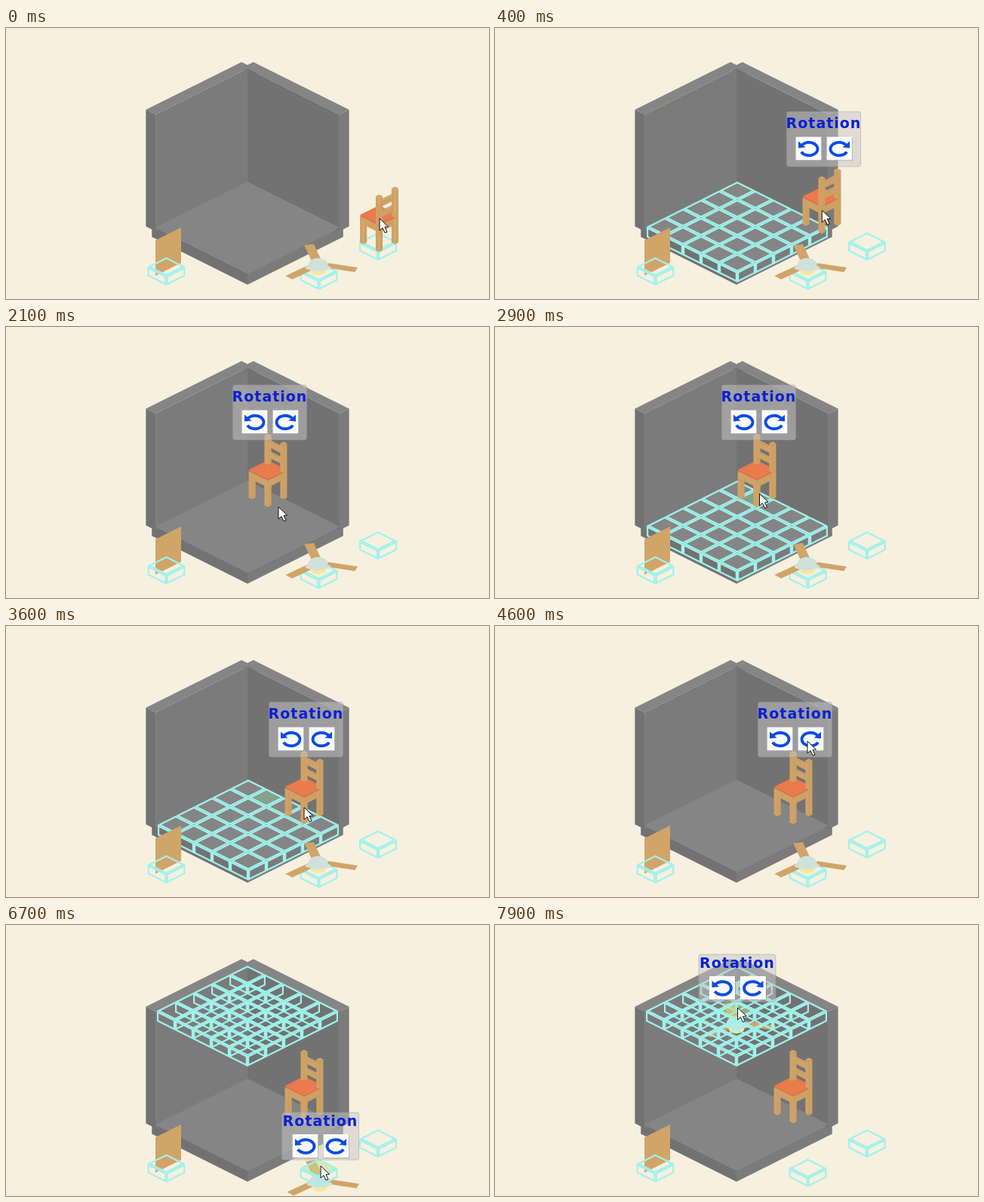
These frames come from a looping animation (640x360 px, 8000 ms). An HTML page with a canvas:

```html
<!DOCTYPE html>
<html lang="en">
<head>
<meta charset="utf-8">
<title>Room furnishing</title>
<style>
html, body { margin: 0; width: 640px; height: 360px; overflow: hidden; background: #f7f0df; }
canvas { display: block; }
</style>
</head>
<body>
<canvas id="stage" width="640" height="360"></canvas>
<script>
const ctx = document.getElementById('stage').getContext('2d');
const LOOP = 8000, STEP = 100;
const CYAN = '#a0f2eb', BLUE = '#0b4be6';
// Colours of the top, front left and front right faces
const GREY = ['#858585', '#727272', '#7b7b7b'];
const WOOD = ['#d1a468', '#cfa266', '#cda064'];
const CUSHION = ['#e97b4c', '#dd7046', '#dd7046'];

// Each move eases to x, y between its start and end times
const move = (start, end, x, y) => ({ start, end, x, y });
const CURSOR = [
  move(0, 0, 495, 253), move(0, 900, 347, 227), move(1200, 1600, 326, 122),
  move(1900, 2100, 361, 239), move(2200, 3100, 349, 219), move(3100, 3600, 395, 241),
  move(3700, 4150, 492, 150), move(4150, 4600, 414, 153), move(6000, 6500, 417, 320),
  move(6700, 7100, 432, 304), move(7400, 7900, 321.5, 110)
];
const CHAIR = [
  move(0, 0, 494.5, 285), move(0, 900, 347, 226.5), move(3100, 3600, 395, 250.5)
];

function follow(moves, t) {
  let { x, y } = moves[0];
  for (const m of moves.slice(1)) {
    const k = Math.min(1, Math.max(0, (t - m.start) / (m.end - m.start)));
    const ease = k * k * (3 - 2 * k);
    x += (m.x - x) * ease;
    y += (m.y - y) * ease;
  }
  return [x, y];
}

function at(x, y, draw) {
  ctx.save();
  ctx.translate(x, y);
  draw();
  ctx.restore();
}

function trace(points) {
  ctx.beginPath();
  for (const [x, y] of points) ctx.lineTo(x, y);
  ctx.closePath();
}

function poly(color, points) {
  trace(points);
  ctx.fillStyle = color;
  ctx.fill();
}

function ellipse(color, x, y, rx, ry) {
  ctx.fillStyle = color;
  ctx.beginPath();
  ctx.ellipse(x, y, rx, ry, 0, 0, 7);
  ctx.fill();
}

// Isometric view: a runs down right, b down left (in tiles), z up (in pixels)
const iso = (a, b, z) => [24 * (a - b), 12 * (a + b) - z];

// Visible faces of a box: top, front left, front right
const faces = ([a0, b0, z0, a1, b1, z1]) => [
  [iso(a0, b0, z1), iso(a1, b0, z1), iso(a1, b1, z1), iso(a0, b1, z1)],
  [iso(a0, b1, z1), iso(a1, b1, z1), iso(a1, b1, z0), iso(a0, b1, z0)],
  [iso(a1, b0, z1), iso(a1, b1, z1), iso(a1, b1, z0), iso(a1, b0, z0)]
];

const solid = (box, colors) => faces(box).forEach((face, i) => poly(colors[i], face));

// Border along the inside of every face
function frame(box) {
  for (const face of faces(box)) {
    ctx.save();
    trace(face);
    ctx.clip();
    ctx.strokeStyle = CYAN;
    ctx.lineWidth = 4.4;
    ctx.stroke();
    ctx.restore();
  }
}

function room() {
  const lap = -.2, out = -.53, end = 5.08, top = 150;
  solid([lap, lap, -15, end, end, 0], GREY);
  solid([lap, out, 0, 0, 0, top], GREY);
  solid([out, lap, -5, 0, end, top], GREY);
  solid([0, out, -5, end, 0, top], GREY);
  poly(GREY[0], [iso(0, 0, 0), iso(end, 0, 0), iso(end, end, 0), iso(0, end, 0)]);
}

function grid(z, filled, lit) {
  for (let a = 0; a < 5; a++) for (let b = 0; b < 5; b++) {
    const box = [a, b, z - 14, a + 1, b + 1, z];
    if (filled) solid(box, GREY);
    if (lit && lit.a === a && lit.b === b) poly(lit.color, faces(box)[0]);
    frame(box);
  }
}

const slot = (x, y) => at(x, y, () => frame([-.52, -.52, -12.5, .52, .52, 0]));

function fan(x, y) {
  at(x, y, () => {
    for (let i = 0; i < 3; i++) {
      ctx.save();
      ctx.scale(1, .5);
      ctx.rotate((17 + 120 * i) * Math.PI / 180);
      ctx.fillStyle = WOOD[0];
      ctx.fillRect(12, -6.5, 41, 13);
      ctx.restore();
    }
    ellipse('#f8e7a0', 0, 9, 10.5, 6);
    ellipse('#cfe2d9', 0, 1, 13, 9);
    ellipse('#cfe2d9', 0, 5, 17, 4);
  });
}

// Quarter turns of a box about the vertical axis
const spin = ([a0, b0, z0, a1, b1, z1], turns) =>
  turns ? spin([-b1, a0, z0, -b0, a1, z1], turns - 1) : [a0, b0, z0, a1, b1, z1];

function chair(x, y, turn) {
  const depth = ([a0, b0, , a1, b1]) => a0 + b0 + a1 + b1;
  const build = boxes => boxes.sort((m, n) => depth(m) - depth(n)).forEach(b => solid(b, WOOD));
  const post = (a, z0, z1) => [a, -.53, z0, a + .19, -.34, z1];
  const rail = (z0, z1) => [-.34, -.49, z0, .34, -.4, z1];
  at(x, y, () => {
    build([0, 1, 2, 3].flatMap(k => [spin(post(-.53, 0, 32), k), spin(rail(25, 32), k)]));
    solid([-.53, -.53, 31, .53, .53, 35], WOOD);
    solid([-.52, -.52, 35, .52, .52, 37], CUSHION);
    build([post(-.53, 35, 72), post(.34, 35, 72), rail(58, 66), rail(44, 51)]
      .map(b => spin(b, turn)));
  });
}

function button(x, y, flip, pressed) {
  at(x, y, () => {
    ctx.fillStyle = '#777';
    ctx.fillRect(-17, -15, 34.5, 31);
    ctx.fillStyle = pressed ? '#a9a9a9' : '#fbfbfb';
    ctx.fillRect(-17, -15.5, 34, 31);
    ctx.scale(flip, 1);
    ctx.strokeStyle = BLUE;
    ctx.lineWidth = 3.8;
    ctx.beginPath();
    ctx.ellipse(.5, .5, 11.5, 8.7, 0, 2.65, -2.7, true);
    ctx.stroke();
    poly(BLUE, [[-13.5, -9.5], [-13.5, -.5], [-4, -1.5]]);
  });
}

function panel(x, y, w, h, baseline, pressed) {
  at(x, y, () => {
    ctx.fillStyle = 'rgba(200,200,200,.5)';
    ctx.strokeStyle = 'rgba(150,150,150,.45)';
    ctx.lineWidth = 1;
    ctx.beginPath();
    ctx.roundRect(.5, .5, w - 1, h - 1, 3);
    ctx.fill();
    ctx.stroke();
    ctx.fillStyle = '#0a20d6';
    ctx.font = 'bold 19px "DejaVu Sans", sans-serif';
    ctx.letterSpacing = '1px';
    ctx.textAlign = 'center';
    ctx.fillText('Rotation', w / 2, baseline);
    for (const side of [-1, 1])
      button(w / 2 + .5 + 20.5 * side, baseline + 27, -side, pressed === side);
  });
}

function pointer(x, y) {
  at(x, y, () => {
    poly('#fff', [[0, 0], [0, 16], [4, 12.5], [7, 19], [10, 18], [7, 11.5], [11.5, 11]]);
    ctx.strokeStyle = '#111';
    ctx.lineWidth = 1;
    ctx.stroke();
  });
}

// One left turn, then a full circle of right turns
function turnAt(t) {
  if (t < 1800) return 1;
  return t < 4700 ? 0 : Math.min(4, Math.floor((t - 4700) / 300)) % 4;
}

function pressedAt(t) {
  if (t === 1700) return -1;
  return t > 4700 && t < 5900 && (t - 4700) % 300 === 200 ? 1 : 0;
}

function render(t) {
  const [mx, my] = follow(CURSOR, t), [cx, cy] = follow(CHAIR, t);
  const dragChair = (t >= 100 && t < 1000) || (t >= 2600 && t < 3800);
  const dragFan = t >= 6700, overRoom = my < 200;
  const glow = 'rgba(190,225,145,.5)';

  ctx.fillStyle = '#f7f0df';
  ctx.fillRect(0, 0, 640, 360);
  at(320, 204, room);
  if (dragChair) at(321, 204, () => grid(0, true, t >= 800 && { a: 1, b: 0, color: '#86a189' }));
  poly(WOOD[0], [[198, 282], [232, 265], [232, 312], [198, 329]]);
  slot(212.5, 317);
  slot(493, 284);
  if (dragFan) {
    fan(mx - 1.5, my + 19);
    at(320, 204, () => grid(150, false, overRoom && { a: 2, b: 2, color: glow }));
    if (!overRoom) at(414.5, 323, () => poly(glow, faces([-.5, -.5, 0, .5, .5, 0])[0]));
  }
  slot(414.5, 323);
  if (!dragFan) fan(413.5, 313.5);
  chair(cx, cy, turnAt(t));

  if (dragFan) panel(mx - 52, my - 71.5, 103, 64, 18, 0);
  else if (t >= 100) panel(cx - 47, cy - 150, 99, 74, 22.5, pressedAt(t));
  pointer(mx, my);
}

function tick() {
  const t = performance.now() % LOOP;
  render(Math.floor(t / STEP) * STEP);
  requestAnimationFrame(tick);
}
tick();
</script>
</body>
</html>
```
